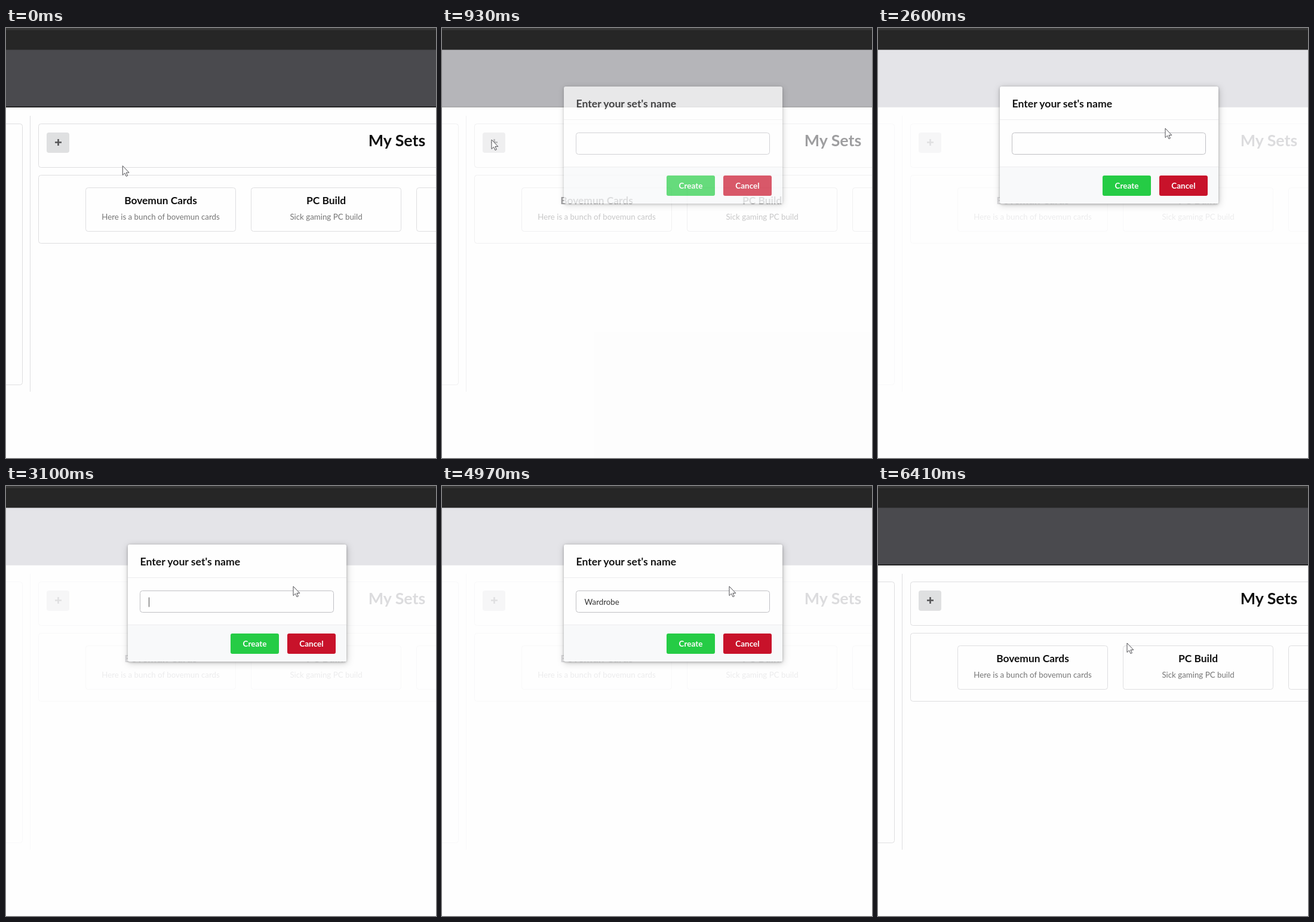
Recreate the animation shown at these times as an HTML page. Size 720x720 px, loop 6.45 s.

```html
<!DOCTYPE html>
<html lang="en">
<head>
<meta charset="utf-8">
<title>My Sets</title>
<style>
  html, body { margin: 0; width: 100%; height: 100%; overflow: hidden; background: #fefefe; }
  svg { display: block; width: 720px; height: 720px; font-family: Lato, sans-serif; }
  .page { --head: #4a4a4e; --edge: #141414; --line: #dedee0; --title: #101010; --note: #757575; --btn: #dfe0e1; --icon: #555557; }
  .dim { --head: #e4e4e8; --edge: #e8e8ea; --line: #f8f8f9; --title: #dcdcde; --note: #ececed; --btn: #f6f6f7; --icon: #e0e0e1; }
  .line { fill: none; stroke: var(--line); }
  .title { fill: var(--title); font-weight: 700; }
  .note { fill: var(--note); font-size: 13.3px; }
  .mid { text-anchor: middle; }
  .sheet { fill: #fefefe; filter: drop-shadow(0 1px 2px rgba(0, 0, 0, .25)) drop-shadow(1px 2px 6px rgba(0, 0, 0, .2)); }
  .label { fill: #fcfcfc; font-size: 13.5px; font-weight: 700; text-anchor: middle; }
</style>
</head>
<body>
<svg id="stage" viewBox="0 0 720 720"></svg>
<script>
const LOOP = 6450;
const WORD = "Wardrobe";
const KEYS = [3200, 3380, 3530, 3680, 3850, 4010, 4170, 4330];
const FOCUS = 1650, CLOSE = 6050;
// time, x, y
const PATH = [
  [0, 196, 231], [480, 83, 187], [1150, 83, 187], [1600, 282, 196],
  [1900, 282, 196], [2450, 481, 168], [5450, 481, 168], [5950, 417, 263]
];

const box = (x, y, w, h, attrs) => `<rect x="${x}" y="${y}" width="${w}" height="${h}" ${attrs}/>`;
const frame = (x, y, w, h) => box(x + .5, y + .5, w, h, 'rx="4" class="line"');
const text = (x, y, str, attrs) => `<text x="${x}" y="${y}" ${attrs}>${str}</text>`;

const card = (x, name, note) => frame(x, 267, 251, 73)
  + text(x + 126, 295, name, 'class="title mid" font-size="17.4"')
  + text(x + 126, 321, note, 'class="note mid"');

const page = cls => `<g class="page ${cls}">
  ${box(0, 0, 720, 720, 'fill="#fefefe"')}
  ${box(0, 36, 720, 97, 'fill="var(--head)"')}
  ${box(0, 131.5, 720, 1.5, 'fill="var(--edge)"')}
  ${frame(-20, 160, 47, 437)}
  <path d="M40.5 147V609" class="line"/>
  ${frame(54, 160, 700, 73)}
  ${frame(54, 246, 700, 114)}
  ${box(68, 175, 38, 34, 'rx="4" fill="var(--btn)"')}
  <path d="M82 191.5H93M87.5 186V197" stroke="var(--icon)" stroke-width="2.6"/>
  ${text(654.5, 198, "My Sets", 'class="title mid" font-size="26.8"')}
  ${card(133, "Bovemun Cards", "Here is a bunch of bovemun cards")}
  ${card(410, "PC Build", "Sick gaming PC build")}
  ${card(687, "", "")}
</g>`;

const button = (x, color, name) => box(x, 247, 81, 34, `rx="3" fill="${color}"`)
  + text(x + 40.5, 268.5, name, 'class="label"');

const modal = `<g id="modal">
  ${box(204, 98, 366, 196, 'rx="3" class="sheet"')}
  ${box(204, 232, 366, 62, 'rx="3" fill="#f8f9fa"')}
  <path d="M204 153.5H570M204 232.5H570" stroke="#ececee"/>
  ${text(224.5, 133, "Enter your set's name", 'font-size="17.65" font-weight="700" fill="#141414"')}
  ${box(224.5, 175.5, 324, 36, 'rx="4" fill="#fefefe" stroke="#c0c0c4"')}
  ${text(238.5, 199, "", 'id="typed" font-size="13.3" fill="#333"')}
  <path id="caret" d="M.5 186.5V202.5" stroke="#4c4c4c"/>
  ${button(376, "#25cc45", "Create")}
  ${button(471, "#c8122a", "Cancel")}
</g>`;

const cursor = `<g id="cursor" stroke="#505054" stroke-linejoin="round">
  <path id="arrow" fill="#fefefe" d="M0 0V15.5L3.6 12.2L6 17.6L8.4 16.5L6 11.4H10.8Z"/>
  <path id="beam" fill="none" stroke-width="1.4" d="M-3.5 -7.5H-1.2L0 -6.5L1.2 -7.5H3.5M0 -6.5V6.5M-3.5 7.5H-1.2L0 6.5L1.2 7.5H3.5"/>
</g>`;

const $ = id => document.getElementById(id);
$("stage").innerHTML = page("") + `<g id="veil">${page("dim")}</g>`
  + box(0, 0, 720, 36.5, 'fill="#262626"') + box(0, 0, 720, 3.5, 'fill="#363636"')
  + modal + cursor;

const clamp = v => Math.min(1, Math.max(0, v));
const easeOut = v => 1 - (1 - v) ** 2;
const easeBoth = v => v * v * (3 - 2 * v);

function pointAt(t) {
  const i = PATH.findIndex(p => p[0] > t);
  if (i < 0) return PATH[PATH.length - 1].slice(1);
  const [t0, x0, y0] = PATH[i - 1], [t1, x1, y1] = PATH[i];
  const v = (t - t0) / (t1 - t0);
  const k = i === 1 ? 1 - (1 - v) ** 3 : easeBoth(v);
  return [x0 + (x1 - x0) * k, y0 + (y1 - y0) * k];
}

const show = (el, on) => el.setAttribute("visibility", on ? "visible" : "hidden");

function draw(t) {
  const fade = t < CLOSE ? easeOut(clamp((t - 705) / 500)) : 1 - easeOut(clamp((t - CLOSE) / 300));
  $("veil").style.opacity = $("modal").style.opacity = fade;

  const count = KEYS.filter(k => k <= t).length;
  const typed = $("typed");
  typed.textContent = WORD.slice(0, count);
  const since = t - (count ? KEYS[count - 1] : FOCUS);
  const end = count ? typed.getComputedTextLength() : 0;
  $("caret").setAttribute("transform", `translate(${Math.round(238.5 + end)} 0)`);
  show($("caret"), since >= 0 && t < CLOSE && since % 1000 < 500);

  const [x, y] = pointAt(t);
  const inField = fade > .5 && x > 224 && x < 549 && y > 175 && y < 212;
  $("cursor").setAttribute("transform", `translate(${x} ${y})`);
  show($("arrow"), !inField);
  show($("beam"), inField);
}

const start = performance.now();
function tick() {
  draw((performance.now() - start) % LOOP);
  requestAnimationFrame(tick);
}
tick();
</script>
</body>
</html>
```
